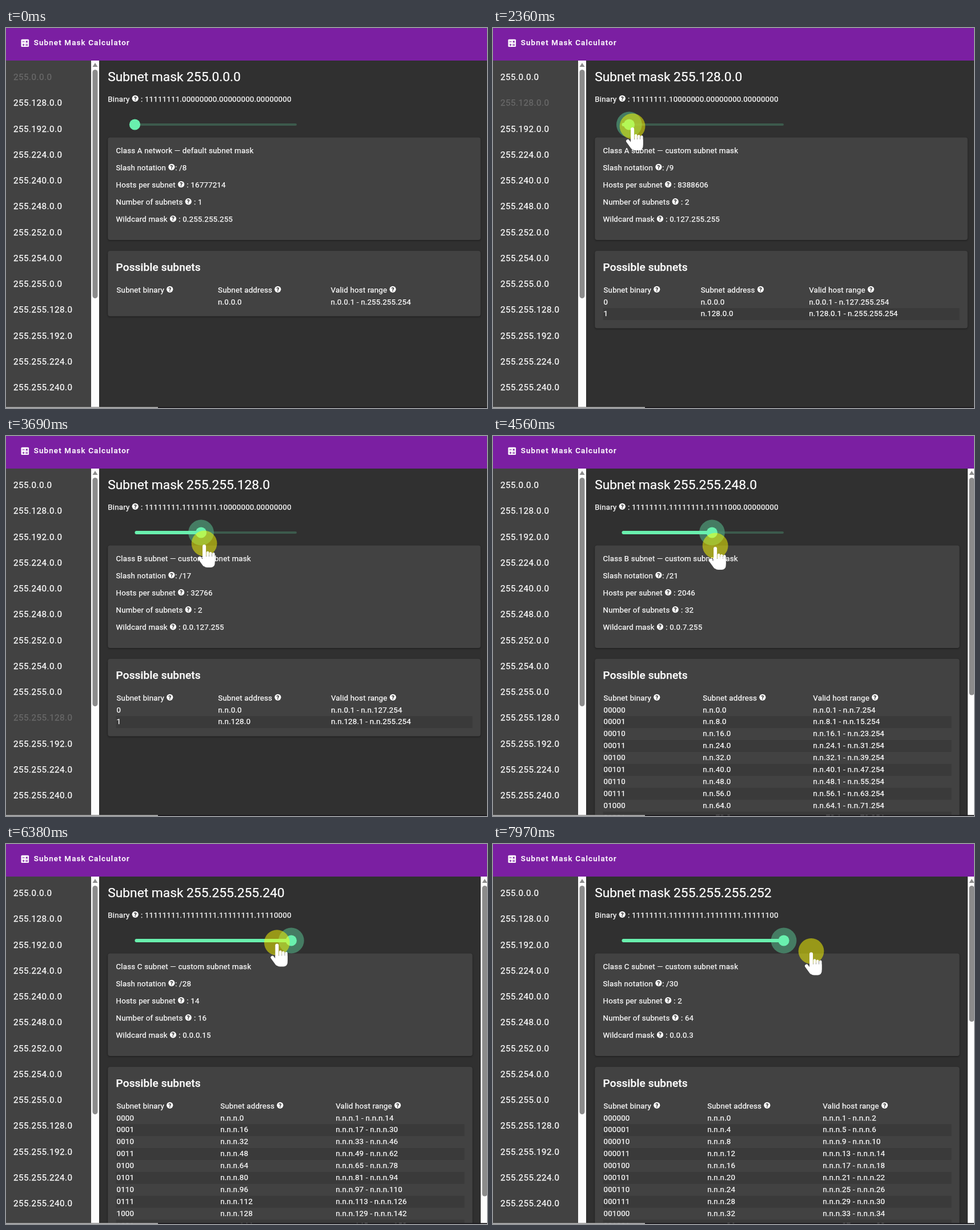
Write an HTML page with a canvas that moves like this. It is 842 by 665 pixels and loops after 8000 ms.

```html
<!DOCTYPE html>
<html lang="en">
<head>
<meta charset="utf-8">
<title>Subnet Mask Calculator</title>
<style>
html, body { margin: 0; width: 100%; height: 100%; overflow: hidden; background: #303030; }
canvas { display: block; width: 842px; height: 665px; }
</style>
</head>
<body>
<canvas id="stage" width="842" height="665"></canvas>
<script>
const ctx = document.getElementById('stage').getContext('2d');
const LOOP = 8000, ENTER = 260, PRESS = 1910, LAG = 40;
const BODY = 13.3, GAP = 0.2, ICON = 12.5, ROW = 20.9;
const TRACK = { x: 225.5, y: 169, w: 283.5 };
const GREEN = '#69f0ae', CARD = '#424242', GREY = '#8b8b8b', PURPLE = '#7b1fa2';
const HEADS = ['Subnet binary ', 'Subnet address ', 'Valid host range '];

// Turning points of the pointer: time, x, y
const PATH = [
  [ENTER, 733, 650], [820, 216, 182], [1080, 216, 182], [1880, 243, 168],
  [2360, 244, 172], [2690, 276, 176], [3690, 347, 188], [4560, 389, 192],
  [5770, 527, 182], [6280, 511, 173], [7040, 235, 170], [7080, 185, 170],
  [7830, 608, 192], [7930, 608, 192], [7970, 557, 187.5]
];

function pointerAt(t) {
  const i = PATH.findIndex(p => p[0] > t);
  if (i < 0) return PATH.at(-1).slice(1);
  const [t0, x0, y0] = PATH[Math.max(0, i - 1)], [t1, x1, y1] = PATH[i];
  const u = t1 > t0 ? (t - t0) / (t1 - t0) : 0;
  // Wide swing over the side list before the drag.
  const swing = t0 === 1080 ? Math.sin(Math.PI * u) : 0;
  return [x0 + (x1 - x0) * u - 197 * swing, y0 + (y1 - y0) * u + 455 * swing];
}

// The page follows the dragged pointer with a short delay.
function prefixAt(t) {
  if (t < PRESS) return 8;
  const u = (pointerAt(t - LAG)[0] - TRACK.x) / TRACK.w;
  return 8 + Math.round(22 * Math.min(1, Math.max(0, u)));
}

const thumbAt = t => [0, 20, 40, 60].reduce((sum, d) => sum + prefixAt(t - d), 0) / 4;

function setFont(size, gap = 0, weight = 400) {
  ctx.font = `${weight} ${size}px Roboto, sans-serif`;
  ctx.letterSpacing = gap + 'px';
}

// Baselines sit on whole pixels; a hairline stroke gives the text its weight.
function text(s, x, y, color = '#fff') {
  y = Math.round(y - 0.7);
  ctx.fillStyle = ctx.strokeStyle = color;
  ctx.lineWidth = 0.25;
  ctx.fillText(s, x, y);
  ctx.strokeText(s, x, y);
}

function rect(x, y, w, h, color) {
  ctx.fillStyle = color;
  ctx.fillRect(x, y, w, h);
}

function round(x, y, w, h, r, color) {
  ctx.fillStyle = color;
  ctx.beginPath();
  ctx.roundRect(x, y, w, h, r);
  ctx.fill();
}

function disc(x, y, r, color) {
  ctx.fillStyle = color;
  ctx.beginPath();
  ctx.arc(x, y, r, 0, 7);
  ctx.fill();
}

function line(x0, y0, x1, y1, width, color) {
  ctx.strokeStyle = color;
  ctx.lineWidth = width;
  ctx.beginPath();
  ctx.moveTo(x0, y0);
  ctx.lineTo(x1, y1);
  ctx.stroke();
}

// Text, help icon, then more text on the same line.
function helpLine(before, after, x, y) {
  setFont(BODY, GAP);
  text(before, x, y);
  x += ctx.measureText(before).width;
  text(after, x + ICON, y);
  const cx = x + ICON / 2;
  disc(cx, y - 6, 5.6, '#fff');
  setFont(9.5, 0, 700);
  ctx.textAlign = 'center';
  text('?', cx, y - 2, '#333');
  ctx.textAlign = 'left';
}

const octets = (v, count) =>
  Array.from({ length: count }, (_, i) => Math.floor(v / 256 ** (count - 1 - i)) % 256).join('.');
const maskValue = n => 2 ** 32 - 2 ** (32 - n);

const cache = {};
function subnets(n) {
  if (cache[n]) return cache[n];
  const fixed = n < 16 ? 1 : n < 24 ? 2 : 3;
  const bits = n - fixed * 8, count = 2 ** bits, size = 2 ** (32 - n);
  const addr = v => 'n.'.repeat(fixed) + octets(v, 4 - fixed);
  const rows = Array.from({ length: count }, (_, i) => [
    bits ? i.toString(2).padStart(bits, '0') : '',
    addr(i * size),
    addr(i * size + 1) + ' - ' + addr(i * size + size - 2)
  ]);
  setFont(BODY, GAP);
  const width = s => ctx.measureText(s).width;
  const cols = HEADS.map((h, c) =>
    1.9 + Math.max(width(h) + ICON, ...rows.map(r => width(r[c]))));
  return cache[n] = { letter: ' ABC'[fixed], bits, count, size, rows, cols };
}

function scrollbar(cx, length) {
  rect(cx - 7, 57, 14, 607, '#fcfcfc');
  ctx.fillStyle = GREY;
  ctx.beginPath();
  ctx.moveTo(cx - 4.5, 68);
  ctx.lineTo(cx, 61);
  ctx.lineTo(cx + 4.5, 68);
  ctx.fill();
  round(cx - 4.5, 73, 9, length, 4.5, GREY);
}

function card(y, right, bottom) {
  ctx.save();
  ctx.shadowColor = 'rgba(0,0,0,.45)';
  ctx.shadowBlur = 3;
  ctx.shadowOffsetY = 1;
  round(178.3, y, right - 178.3, bottom - y, 4, CARD);
  ctx.restore();
}

function header() {
  rect(0, 0, 842, 57, PURPLE);
  round(26.5, 19.7, 13.6, 13.4, 1.6, '#fff');
  line(28.6, 24, 32.6, 24, 1.1, PURPLE);
  line(28.6, 29.5, 32.6, 29.5, 1.1, PURPLE);
  line(30.6, 27.5, 30.6, 31.5, 1.1, PURPLE);
  for (const s of [-1, 1]) {
    line(34.3, 29.5 + s, 38.3, 29.5 + s, 1.1, PURPLE);
    line(34.8, 24 - 1.5 * s, 37.8, 24 + 1.5 * s, 1.1, PURPLE);
  }
  setFont(BODY, 1.19, 500);
  text('Subnet Mask Calculator', 48.8, 30.3);
}

function sidebar(n) {
  rect(0, 57, 149, 607, CARD);
  setFont(15.2, 0.475);
  for (let i = 0; i < 13; i++)
    text(octets(maskValue(i + 8), 4), 13, 91.7 + 45.27 * i, n === i + 8 ? '#6a6a6a' : '#fff');
  scrollbar(156, 400);
}

function slider(pos, pressed) {
  const { x, y, w } = TRACK, done = w * (pos - 8) / 22;
  round(x, y - 2, w, 4, 2, '#3c5a4c');
  if (pressed) disc(x + done, y, 22.4, 'rgba(77,150,116,.75)');
  round(x, y - 3, done, 6, 3, GREEN);
  disc(x + done, y, 9.6, GREEN);
}

function details(n, net, right) {
  card(191.5, right, 371);
  const kind = net.bits ? 'subnet — custom' : 'network — default';
  setFont(BODY, GAP);
  text(`Class ${net.letter} ${kind} subnet mask`, 192.5, 219.3);
  const lines = [
    ['Slash notation ', `: /${n}`],
    ['Hosts per subnet ', ` : ${net.size - 2}`],
    ['Number of subnets ', ` : ${net.count}`],
    ['Wildcard mask ', ` : ${octets(net.size - 1, 4)}`]
  ];
  lines.forEach(([label, value], i) => helpLine(label, value, 192.5, 249.3 + 30.2 * i));
}

function table(net, right) {
  card(390, right, 483.7 + ROW * net.count);
  setFont(19, 0.15, 500);
  text('Possible subnets', 192.5, 425.7);
  const width = right - 14.25 - 192.5;
  const total = net.cols.reduce((a, b) => a + b);
  const shown = net.rows.slice(0, 10);
  shown.forEach((_, r) => {
    if (r % 2) rect(192.5, 469.3 + ROW * r, width, ROW, '#3a3a3a');
  });
  let x = 193.5;
  HEADS.forEach((head, c) => {
    helpLine(head, '', x, 463.3);
    setFont(BODY, GAP);
    shown.forEach((row, r) => text(row[c], x, 484.2 + ROW * r));
    x += width * net.cols[c] / total;
  });
}

function pointer(x, y) {
  disc(x, y, 22.4, 'rgba(255,255,0,.5)');
  ctx.save();
  ctx.translate(x, y);
  ctx.lineCap = 'round';
  line(0, 5, 0, 30, 6, '#fff');
  for (let i = 0; i < 3; i++)
    line(6 + 5.1 * i, 16 + 1.2 * i, 6 + 5.1 * i, 32, 4.6, '#fff');
  line(-8, 26, 0, 37, 6, '#fff');
  round(-3, 23, 21.5, 19, [0, 0, 7, 8], '#fff');
  ctx.restore();
}

function draw(t) {
  const n = prefixAt(t), net = subnets(n);
  const content = 446.7 + ROW * net.count;
  const scrolls = content > 666;
  const right = scrolls ? 816.6 : 830.8;

  rect(0, 0, 842, 665, '#303030');
  setFont(22.75);
  text('Subnet mask ' + octets(maskValue(n), 4), 178.3, 94);
  const bits = maskValue(n).toString(2).match(/.{8}/g).join('.');
  helpLine('Binary ', ' : ' + bits, 178.3, 129.3);
  details(n, net, right);
  table(net, right);
  slider(thumbAt(t), t >= PRESS);
  if (scrolls) scrollbar(838, 637.5 * 666 / content);
  sidebar(n);
  header();
  rect(0, 663.3, 842, 1.7, '#1c1a1e');
  rect(0, 663.3, 266, 1.7, '#b4b4b4');
  if (t >= ENTER) pointer(...pointerAt(t));
}

function loop() {
  draw(performance.now() % LOOP);
  requestAnimationFrame(loop);
}
loop();
</script>
</body>
</html>
```
